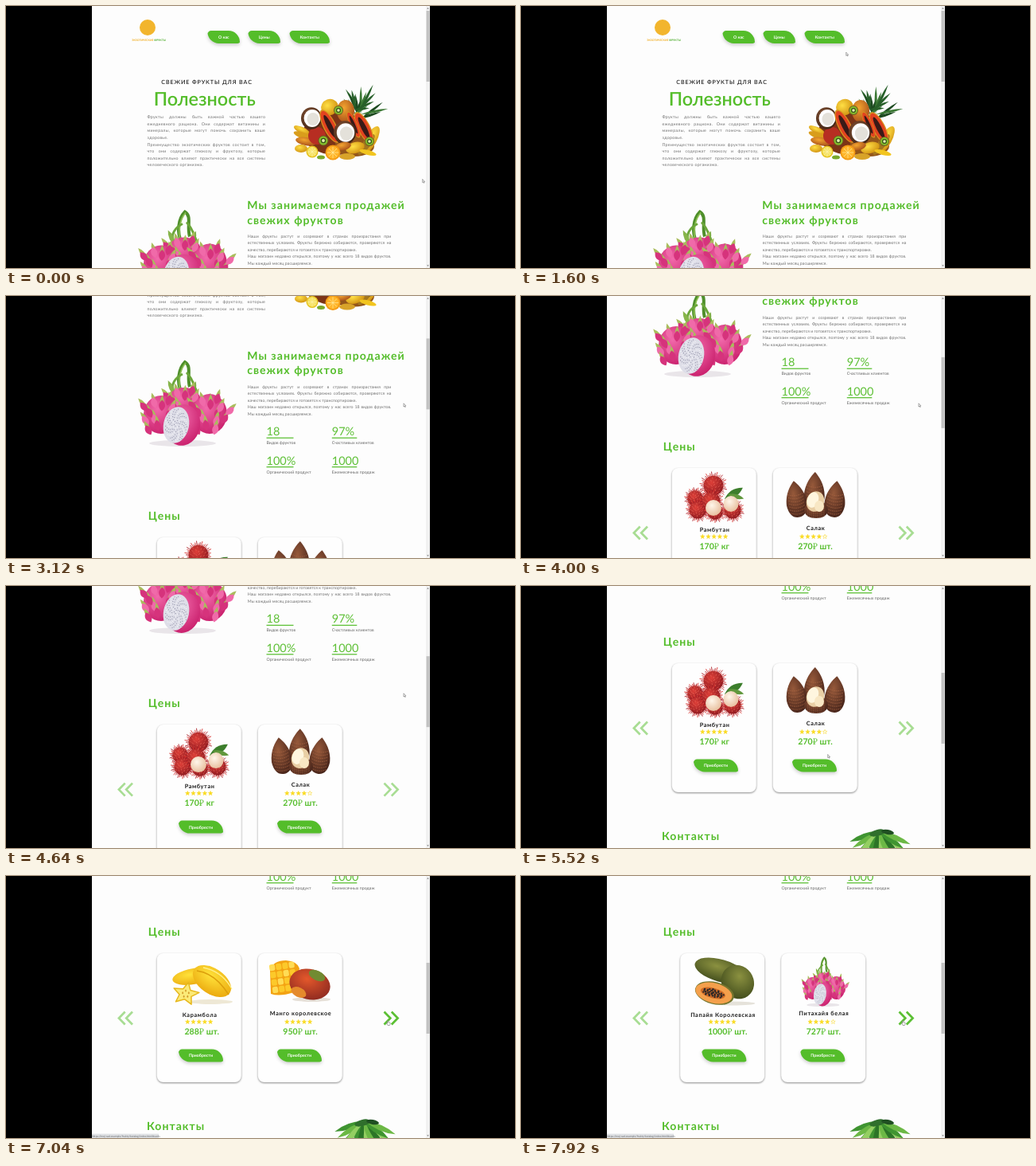
These frames come from a looping animation (640x329 px, 8000 ms). An HTML page:

```html
<!DOCTYPE html>
<html lang="ru">
<head>
<meta charset="utf-8">
<title>Свежие фрукты</title>
<style>
  html, body { margin: 0; width: 100%; height: 100%; overflow: hidden; background: #000; }
  #stage { position: relative; width: 640px; height: 329px; overflow: hidden; background: #000;
    font-family: Lato, "Open Sans", sans-serif; text-rendering: geometricPrecision; }
  #window { position: absolute; inset: 0; clip-path: inset(0 107px 0 108px); background: #fdfdfd; }
  #page { position: absolute; left: 0; top: 0; width: 640px; height: 1171px; }
  svg { position: absolute; left: 0; top: 0; }
  .para { position: absolute; font-size: 5.28px; color: #707070; white-space: nowrap; }
  .para div { text-align-last: justify; }
  .para .end { text-align-last: left; }
  .small { font-size: 5.28px; fill: #666; }
  .title { font-size: 14.06px; font-weight: 700; letter-spacing: 1.05px; fill: #54bd2a; }
  .hero { font-size: 23.45px; font-weight: 600; fill: #54bd2a; text-anchor: middle; }
  .kicker { font-size: 7.18px; font-weight: 500; letter-spacing: .88px; fill: #111; }
  .count { font-size: 14.5px; fill: #5ec036; }
  .name { font-size: 7.33px; font-weight: 700; letter-spacing: .59px; fill: #1c1c1c; text-anchor: middle; }
  .price { font-size: 10.55px; font-weight: 700; fill: #54bd2a; }
  .ruble { font-weight: 400; font-family: "Noto Serif", "DejaVu Sans", serif; }
  .label { font-size: 5.28px; font-weight: 700; fill: #fff; text-anchor: middle; }
  .brand { font-size: 3.4px; font-weight: 700; text-anchor: middle; }
  .button { fill: #54bd2a; filter: drop-shadow(0 2.4px 2px rgba(0,0,0,.2)); }
  .button.on { fill: #47a722; }
  .button text { fill: #fff; }
  .card { fill: #fefefe; filter: drop-shadow(0 1px .8px rgba(0,0,0,.45)); }
  .arrow { fill: none; stroke: #54bd2a; stroke-width: 2.7; opacity: .5; }
  .cursor { fill: #fff; stroke: #555; stroke-width: .5; }
</style>
</head>
<body>
<div id="stage">
  <div id="window">
    <div id="page"></div>
    <svg id="chrome" width="640" height="329"></svg>
  </div>
</div>
<script>
const TAU = Math.PI * 2;
const $ = id => document.getElementById(id);
const times = (n, fn) => Array.from({ length: n }, (_, i) => fn(i)).join('');

// Drawing helpers
const text = (x, y, cls, str) => `<text x="${x}" y="${y}" class="${cls}">${str}</text>`;
const oval = (x, y, rx, ry, fill, turn = 0) =>
  `<ellipse cx="${x}" cy="${y}" rx="${rx}" ry="${ry}" fill="${fill}" transform="rotate(${turn} ${x} ${y})"/>`;
const path = (d, fill, more = '') => `<path d="${d}" fill="${fill}" ${more}/>`;
const line = (d, color, width) => path(d, 'none', `stroke="${color}" stroke-width="${width}"`);
const group = (transform, body) => `<g transform="${transform}">${body}</g>`;
const gradient = (id, light, dark) => `<radialGradient id="${id}" cx=".4" cy=".35" r=".7">
  <stop stop-color="${light}"/><stop offset="1" stop-color="${dark}"/></radialGradient>`;
const blade = (x, y, length, width, angle, fill) =>
  group(`translate(${x} ${y}) rotate(${angle})`,
    path(`M0,0Q${width},${-length / 2} 0,${-length}Q${-width},${-length / 2} 0,0`, fill));
const paragraph = (x, y, width, pitch, spacing, lines) =>
  `<div class="para" style="left:${x}px;top:${y}px;width:${width}px;line-height:${pitch}px;letter-spacing:${spacing}px">` +
  lines.map(s => `<div${s.endsWith('.') ? ' class="end"' : ''}>${s}</div>`).join('') + '</div>';

function button(x, y, w, label, id = '') {
  const r = x + w, b = y + 16, big = 14.2, small = 4.5;
  const arc = (radius, to) => `A${radius},${radius} 0 0 1 ${to}`;
  const shape = `M${x},${y + small}${arc(small, `${x + small},${y}`)}H${r - big}${arc(big, `${r},${y + big}`)}` +
    `A${small},1.8 0 0 1 ${r - small},${b}H${x + big}${arc(big, `${x},${b - big}`)}Z`;
  return `<g class="button" id="${id}"><path d="${shape}"/>${text(x + w / 2, y + 9.9, 'label', label)}</g>`;
}

function star(x, y, filled) {
  const points = times(10, i => {
    const r = i % 2 ? 1.2 : 2.9, a = i * TAU / 10;
    return `${x + r * Math.sin(a)},${y - r * Math.cos(a)} `;
  });
  return `<polygon points="${points}" fill="${filled ? '#fbdd1c' : 'none'}" stroke="#f7d51c" stroke-width=".5"/>`;
}

const orange = (x, y, r, rind, flesh) => oval(x, y, r, r, rind) + oval(x, y, r * .82, r * .82, flesh) +
  times(8, i => line(`M${x},${y}l${r * .75 * Math.cos(i * TAU / 8)},${r * .75 * Math.sin(i * TAU / 8)}`, '#fff3b0', .6));
const kiwi = (x, y, r) => oval(x, y, r, r, '#6c5a22') + oval(x, y, r * .85, r * .85, '#86bd2c') +
  oval(x, y, r * .5, r * .5, '#35521a') + oval(x, y, r * .3, r * .3, '#e6ecae');
const coconut = (x, y, r) => oval(x, y, r, r * 1.06, 'url(#husk)') +
  oval(x + 1, y, r * .8, r * .84, '#fff') + oval(x + 2, y + 1, r * .58, r * .62, '#e4e1da');
const papayaSlice = (x, y, rx, ry, turn) => oval(x, y, rx, ry, '#d9921f', turn) +
  oval(x, y, rx * .85, ry * .92, '#e2431f', turn) + oval(x, y, rx * .4, ry * .68, '#3a1a17', turn);

// Fruit pictures
const fruitPile = () =>
  times(21, i => blade(437 + i % 4 * 3, 142 - i % 3 * 6, 20 + i % 4 * 5, 3.2, -45 + i * 6.5, ['#1d4a20', '#3a7733', '#28602a'][i % 3])) +
  oval(415, 160, 42, 27, '#7c3416') + oval(438, 176, 25, 13, '#94561a') +
  oval(407, 127, 11, 10, 'url(#gold)', -20) + oval(427, 132, 11, 14, 'url(#amber)') + kiwi(418, 131, 6) +
  oval(459, 168, 7, 19, 'url(#gold)', 28) + oval(453, 174, 5, 16, '#a3761e', 38) +
  oval(372, 156, 11, 4, 'url(#gold)', 25) + oval(374, 163, 13, 4, '#d99d1c', 20) + oval(377, 170, 13, 5, 'url(#amber)', 10) +
  oval(391, 163, 11, 11, '#b72e22') + coconut(384, 141, 13) +
  papayaSlice(407, 151, 8, 23, -27) + papayaSlice(450, 153, 8, 22, -27) + papayaSlice(437, 149, 5, 18, -24) +
  coconut(426, 159, 14) + kiwi(399, 169, 6.5) + kiwi(457, 170, 6) +
  oval(439, 178, 12, 7, 'url(#gold)', -15) + oval(424, 176, 10, 5, 'url(#amber)', -10) +
  oval(455, 184, 11, 3, '#f2c51f', 15) + oval(371, 179, 8, 5, 'url(#gold)') +
  orange(385, 183, 7.5, '#e6c11c', '#f5e263') + orange(411, 184, 9.5, '#f39a13', '#ffb52a') +
  oval(429, 189, 10, 4, '#d8a329') + oval(396, 190, 5, 2.5, '#79a92b');

const pitayaScales = (x, y, rx, ry) => oval(x, y, rx, ry, 'url(#pink)') + times(15, i => {
  const a = i * 2.4, k = .35 + i / 22;
  const px = x + Math.cos(a) * rx * k, py = y + Math.sin(a) * ry * k, turn = (px - x) * 2.4;
  return blade(px, py + 4, 18, 5, turn, '#a9bd5c') + blade(px, py + 6, 14, 8, turn, i % 2 ? '#f06aa9' : '#d6337c');
});
const pitaya = () =>
  oval(222, 273, 42, 4, '#e9e5e9') +
  line('M221,210C214,196 217,179 225,171C234,176 227,190 231,202', '#4f8f2b', 4) +
  line('M220,209C215,196 219,180 226,172', '#8fc252', 1.6) +
  line('M211,212C205,199 214,190 222,186M227,184C235,192 236,200 241,211', '#6ba63a', 3) +
  blade(213, 214, 22, 6, -25, '#87b54b') + blade(232, 214, 20, 6, 20, '#79ab42') +
  pitayaScales(224, 222, 22, 19) + pitayaScales(195, 237, 22, 24) + pitayaScales(256, 236, 22, 25) +
  oval(222, 250, 22, 26, 'url(#pink)', 12) + oval(214, 250, 16, 23, '#dedee8', 12) +
  times(120, i => {
    const a = i * 2.4, r = Math.sqrt(i / 120);
    return oval(214 + Math.cos(a) * 14 * r, 250 + Math.sin(a) * 21 * r, .55, .55, i % 3 ? '#85859c' : '#fff');
  });

const hairyBall = (x, y, r) => times(44, i => {
  const a = i * TAU / 44, l = r * (1.02 + .12 * (i % 3));
  return line(`M${x},${y}l${l * Math.cos(a)},${l * Math.sin(a)}`, i % 2 ? '#d93430' : '#a91e25', .9);
}) + oval(x, y, r * .88, r * .88, 'url(#red)') + times(26, i => {
  const a = i * 2.4, d = r * .8 * Math.sqrt(i / 26);
  return line(`M${x + d * Math.cos(a)},${y + d * Math.sin(a)}l${2 * Math.cos(a)},-2`, '#f1705e', .6);
});
const rambutan = () =>
  blade(256, 136, 27, 9, 58, '#3c7e2c') + blade(260, 130, 21, 6, 105, '#61983d') +
  hairyBall(242, 119, 14) + hairyBall(219, 135, 11) + hairyBall(222, 150, 12) + hairyBall(239, 139, 13) +
  hairyBall(266, 150, 12) + hairyBall(244, 152, 11) +
  oval(242, 147, 10, 10, 'url(#flesh)') + oval(264, 142, 9.5, 10, 'url(#flesh)');

const salakDrop = (x, y, w, h, turn) => group(`translate(${x} ${y}) rotate(${turn})`,
  path(`M0,${-h}C${w * .35},${-h * .8} ${w},${-h * .35} ${w},${h * .3}Q${w * .85},${h} 0,${h}` +
    `Q${-w * .85},${h} ${-w},${h * .3}C${-w},${-h * .35} ${-w * .35},${-h * .8} 0,${-h}`, 'url(#brown)') +
  times(7, i => path(`M${-w * .75},${h * (-.3 + i * .17)}q${w * .75},5 ${w * 1.5},0`, 'none',
    'stroke="#ad6745" stroke-width=".7" stroke-dasharray="1.6 1"')));
const salak = () =>
  salakDrop(369, 126, 13, 24, 2) + salakDrop(346, 136, 13, 23, -8) + salakDrop(395, 136, 13, 23, 6) + salakDrop(371, 147, 15, 13, 0) +
  oval(370, 139, 11, 13, '#e9cfa5', 20) + oval(367, 137, 7, 10, '#fff6df', 18) + oval(375, 145, 6, 7, '#f8e7c4');

const carambola = () => {
  const slice = times(10, i => {
    const r = i % 2 ? 8 : 17, a = i * TAU / 10 + .2;
    return `${226 + r * Math.sin(a)},${148 - r * .85 * Math.cos(a)} `;
  });
  return oval(257, 158, 28, 3, '#eee8d5') + oval(236, 126, 27, 10, 'url(#lemon)', -10) + oval(259, 132, 27, 16, 'url(#lemon)', 34) +
    line('M240,119Q263,122 280,149', '#dc9f0c', 1.6) + line('M248,115Q272,120 284,142', '#fff08a', 1.4) +
    `<polygon points="${slice}" fill="#fbea78" stroke="#e7b81c" stroke-width="1.5" stroke-linejoin="round"/>` +
    times(5, i => oval(226 + 4 * Math.sin(i * TAU / 5), 148 - 4 * Math.cos(i * TAU / 5), .9, 1.6, '#d39b2a'));
};

const mango = () =>
  oval(384, 155, 24, 3, '#e6e0d8') + path('M332,118Q336,106 352,106Q366,107 369,116L362,146Q344,152 333,148Z', '#f3a313') +
  times(16, i => `<rect x="${333 + i % 4 * 8.2}" y="${109 + (i >> 2) * 9.4}" width="7" height="8" rx="2" fill="${i % 3 ? '#fcc92a' : '#ffdc55'}" transform="rotate(-8 350 127)"/>`) +
  oval(382, 136, 26, 19, 'url(#mango)', 14) + oval(391, 125, 11, 6, '#718b32', 25) + oval(368, 146, 10, 6, '#e58a2c', 25);

const papaya = () =>
  oval(256, 160, 28, 2.5, '#e5e2da') + oval(241, 119, 34, 14, 'url(#olive)', 16) + oval(262, 133, 22, 20, 'url(#olive)', 55) +
  oval(233, 147, 25, 14, '#74752d', 14) + oval(232, 147, 23.5, 12.5, '#f4a04c', 14) + oval(231, 147, 16, 6.5, '#cf6c27', 14) +
  times(38, i => {
    const a = i * 2.4, r = Math.sqrt(i / 38);
    return oval(231 + Math.cos(a) * 14 * r, 147 + Math.sin(a) * 5 * r + Math.cos(a) * 3 * r, 1.3, 1.1, '#2b2727');
  });

const smallPitaya = () => group('translate(343 101) scale(.49 .58) translate(-168 -168)', pitaya());

const greens = () => times(14, i =>
  blade(449 + i % 3 * 3, 308, 38 + i % 4 * 3, 7, 250 - i * 10.5, ['#3f9431', '#6cb845', '#2c7527', '#94cf62'][i % 4])) +
  oval(448, 310, 10, 4, '#2f6f2c', -15) + oval(461, 309, 8, 3, '#1f4f22', 10);

// Carousel
const slides = [
  [[rambutan, 'Рамбутан', 5, '170', 'кг'], [salak, 'Салак', 4, '270', 'шт.']],
  [[carambola, 'Карамбола', 5, '288', 'шт.'], [mango, 'Манго королевское', 5, '950', 'шт.']],
  [[papaya, 'Папайя Королевская', 5, '1000', 'шт.'], [smallPitaya, 'Питахайя белая', 4, '727', 'шт.']],
];
const card = ([picture, name, rating, price, unit], second) => {
  const x = second ? 316.8 : 189.8;
  return `<rect class="card" x="${x}" y="97" width="106" height="162" rx="8"/>` + picture() +
    text(x + 53.8, second ? 174.6 : 176.6, 'name', name) +
    times(5, i => star((second ? 353.3 : 228.3) + i * 7.2, 183.2, i < rating)) +
    text(second ? 348.3 : 224.5, 199.2, 'price', `${price}<tspan class="ruble">₽</tspan> ${unit}`) +
    button(second ? 341 : 217, 217.5, 56, 'Приобрести');
};
const arrow = (x, dir, id) => `<path class="arrow" id="${id}" d="${[0, 9.3].map(d =>
  `M${x + dir * d},170.5l${dir * 7.8},8l${-dir * 7.8},8`).join('')}"/>`;

const counter = (x, y, value, width, label) => text(x, y, 'count', value) +
  `<rect x="${x}" y="${y + 2.3}" width="${width}" height="1.2" fill="#54bd2a"/>` + text(x, y + 10.7, 'small', label);

$('page').innerHTML = `<svg width="640" height="1171"><defs>` +
  gradient('husk', '#8a5636', '#3f2415') + gradient('gold', '#ffdf45', '#d0900f') + gradient('amber', '#f3a52f', '#a9501a') +
  gradient('pink', '#f26aab', '#c91f6c') + gradient('red', '#dd3f38', '#8e1a20') + gradient('flesh', '#fff6ea', '#e7bd9b') +
  gradient('brown', '#96593a', '#47241a') + gradient('lemon', '#ffe23a', '#eba90f') + gradient('mango', '#e4582b', '#8e2a20') +
  gradient('olive', '#8b9140', '#414c1c') + '</defs>' +
  '<circle cx="178" cy="27" r="10" fill="#f2b52d"/>' +
  text(179.5, 44.3, 'brand', '<tspan fill="#f0ac1d">ЭКЗОТИЧЕСКИЕ</tspan> <tspan fill="#4bab29">ФРУКТЫ</tspan>') +
  button(253.5, 31, 40.5, 'О нас', 'nav0') + button(304.5, 31, 40.5, 'Цены', 'nav1') + button(356.5, 31, 50.5, 'Контакты', 'nav2') +
  text(195.3, 97.9, 'kicker', 'СВЕЖИЕ ФРУКТЫ ДЛЯ ВАС') + text(249.7, 125.2, 'hero', 'Полезность') + fruitPile() +
  text(303.2, 255, 'title', 'Мы занимаемся продажей') + text(303.2, 273.6, 'title', 'свежих фруктов') +
  group('translate(0 87.5)', pitaya()) +
  counter(327.5, 350.8, '18', 34, 'Видов фруктов') + counter(409.8, 350.8, '97%', 31.5, 'Счастливых клиентов') +
  counter(327.5, 387.3, '100%', 34, 'Органический продукт') + counter(409.8, 387.3, '1000', 31.5, 'Ежемесячных продаж') +
  text(178.8, 456, 'title', 'Цены') +
  group('translate(0 381.5)', slides.map((pair, i) => `<g id="slide${i}">${pair.map(card).join('')}</g>`).join('') +
    arrow(159, -1, 'prev') + arrow(475.5, 1, 'next') + text(177, 318.6, 'title', 'Контакты') + greens()) +
  '</svg>' +
  paragraph(177.5, 136.3, 148.7, 8.57, .29, [
    'Фрукты должны быть важной частью вашего', 'ежедневного рациона. Они содержат витамины и',
    'минералы, которые могут помочь сохранить ваше', 'здоровье.',
    'Преимущество экзотических фруктов состоит в том,', 'что они содержат глюкозу и фруктозу, которые',
    'положительно влияют практически на все системы', 'человеческого организма.']) +
  paragraph(303.8, 285.6, 180.5, 8.5, 0, [
    'Наши фрукты растут и созревают в странах произрастания при',
    'естественных условиях. Фрукты бережно собираются, проверяются на',
    'качество, перебираются и готовятся к транспортировке.',
    'Наш магазин недавно открылся, поэтому у нас всего 18 видов фруктов.',
    'Мы каждый месяц расширяемся.']).replace('class="end">Наш ', '>Наш ');

$('chrome').innerHTML = `<rect x="528" width="5" height="329" fill="#f1f1f1"/>
  <rect id="thumb" x="528.6" y="6" width="4" height="89" fill="#c1c1c1"/>
  <path d="M529.2,3.6l1.3,-1.4l1.3,1.4zM529.2,325.4l1.3,1.4l1.3,-1.4z" fill="#555"/>
  <g id="status"><rect x="107" y="323.7" width="85" height="6" fill="#dfe1e4"/>
  <text x="108.5" y="327.7" font-size="3.4" fill="#62666c">https://moj-sad.example/frukty/katalog/index.html#cards</text></g>
  <path id="pointer" class="cursor" d="M0,0V4.2L1,3.4L1.7,4.8L2.3,4.5L1.7,3.1H2.9Z"/>
  <path id="hand" class="cursor" d="M0,.4Q.6,-.3 1.1,.4V2.2L3.4,2.8V4.6L2.7,6H.4L-1.3,3.6L-.8,3.1L0,3.7Z"/>`;

// Motion
const LOOP = 8000, STEP = 80, SLIDE_WIDTH = 426;
const scrollKeys = [[2040, 0], [2400, 87.5], [2720, 87.5], [3120, 175.5], [3520, 175.5], [4000, 262.5], [4400, 262.5], [5000, 381.5]];
const cursorKeys = [[0, 523.7, 217.5], [880, 270, 40], [1120, 276, 41], [1320, 325, 41], [1520, 380, 40], [1760, 491, 110],
  [1920, 500, 134.8], [5040, 500, 134.8], [5480, 385.7, 211.5], [5600, 385.7, 211.5], [6160, 479.7, 181.5]];
const clamp = x => Math.min(1, Math.max(0, x));
const smooth = x => x * x * (3 - 2 * x);

function track(keys, t, column = 1) {
  const next = keys.findIndex(k => k[0] > t);
  if (next < 0) return keys.at(-1)[column];
  if (next === 0) return keys[0][column];
  const a = keys[next - 1], b = keys[next];
  return a[column] + (b[column] - a[column]) * smooth((t - a[0]) / (b[0] - a[0]));
}

// CSS "ease": cubic-bezier(.25, .1, .25, 1)
function ease(x) {
  if (x <= 0 || x >= 1) return clamp(x);
  const bezier = (s, p, q) => 3 * (1 - s) ** 2 * s * p + 3 * (1 - s) * s * s * q + s ** 3;
  let low = 0, high = 1;
  for (let i = 0; i < 24; i++) {
    const mid = (low + high) / 2;
    if (bezier(mid, .25, .25) < x) low = mid; else high = mid;
  }
  return bezier(low, .1, 1);
}

function draw(t) {
  const scroll = track(scrollKeys, t);
  $('page').style.transform = `translateY(${-scroll}px)`;
  $('thumb').setAttribute('y', 6 + scroll * .27);

  const position = ease((t - 6435) / 600) + ease((t - 7440) / 600);
  slides.forEach((_, i) => $('slide' + i).setAttribute('transform', `translate(${(i - position) * SLIDE_WIDTH} 0)`));

  const x = track(cursorKeys, t), y = track(cursorKeys, t, 2);
  const overNav = [[253.5, 294], [304.5, 345], [356.5, 407]].map(([l, r]) => scroll === 0 && y > 31 && y < 47 && x > l && x < r);
  overNav.forEach((on, i) => $('nav' + i).classList.toggle('on', on));
  const overNext = t > 5600 && x > 470;
  $('next').style.opacity = overNext ? .95 : .5;
  $('status').style.display = overNext ? '' : 'none';

  const linked = overNext || overNav.includes(true);
  for (const [id, shown] of [['hand', linked], ['pointer', !linked]]) {
    $(id).style.display = shown ? '' : 'none';
    $(id).setAttribute('transform', `translate(${x} ${y})`);
  }
}

function frame() {
  draw(Math.floor(performance.now() % LOOP / STEP) * STEP);
  requestAnimationFrame(frame);
}
frame();
</script>
</body>
</html>
```
